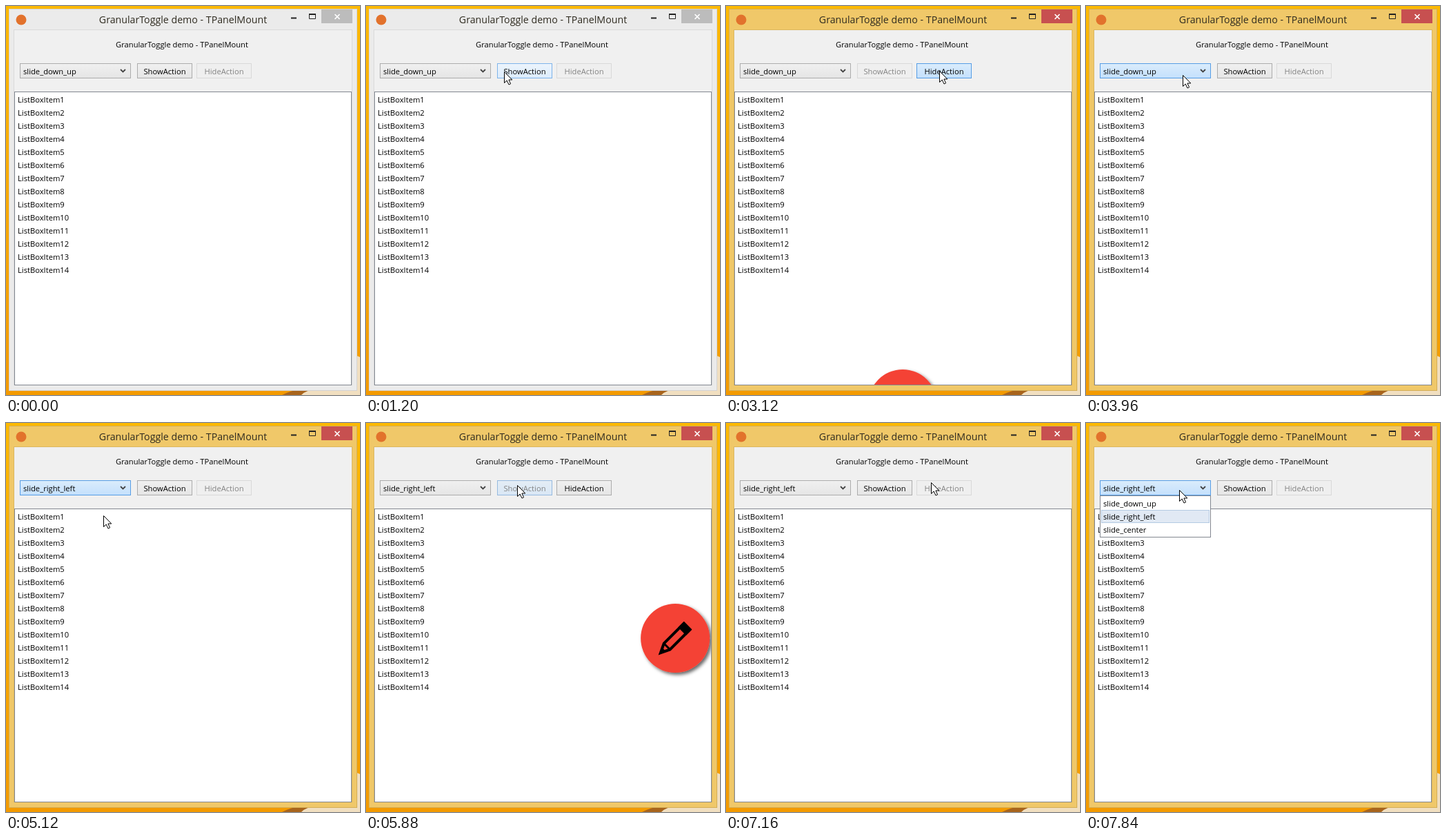
An HTML page that plays this animation: 513 px wide and 564 px high, repeating every 8000 ms.

```html
<!DOCTYPE html>
<html lang="en">
<head>
<meta charset="utf-8">
<title>Widget demo</title>
<style>
  html, body { margin: 0; width: 100%; height: 100%; overflow: hidden; }
  svg { display: block; width: 513px; height: 564px; }
  text { font: 11.2px "Open Sans", "Noto Sans", sans-serif; fill: #000; }
  .mid { text-anchor: middle; }
  .title { font-size: 14.2px; fill: #2f2b20; }
  .off { fill: #838383; }
</style>
</head>
<body>
<svg viewBox="0 0 513 564">
  <defs>
    <linearGradient id="desk" x2="0" y2="1"><stop stop-color="#fdb900"/><stop offset="1" stop-color="#f39a00"/></linearGradient>
    <linearGradient id="normal" x2="0" y2="1"><stop stop-color="#f0f0f0"/><stop offset="1" stop-color="#e5e5e5"/></linearGradient>
    <linearGradient id="hover" x2="0" y2="1"><stop stop-color="#ecf4fc"/><stop offset="1" stop-color="#dcecfc"/></linearGradient>
    <linearGradient id="press" x2="0" y2="1"><stop stop-color="#daecfc"/><stop offset="1" stop-color="#c4e0fc"/></linearGradient>
    <filter id="shadow" x="-20%" y="-20%" width="140%" height="140%">
      <feDropShadow dx="3" dy="3" stdDeviation="2.6" flood-opacity=".6"/>
    </filter>
    <clipPath id="area"><rect x="13" y="125" width="487" height="424"/></clipPath>
  </defs>

  <rect width="513" height="564" fill="url(#desk)"/>
  <path d="M400 564Q412 558 424 556H445V564Z" fill="#a8641c"/>
  <path d="M428 564Q436 556 450 556H508V507L513 509V564Z" fill="#f1dfc0"/>

  <rect id="frame" x="4.5" y="4.5" width="504" height="553"/>
  <circle cx="22" cy="20" r="7.5" fill="#e2722c"/>
  <text class="mid title" x="256.5" y="25">GranularToggle demo - TPanelMount</text>
  <path d="M413 17.5H421" stroke="#222" stroke-width="2"/>
  <path d="M439.5 12V18.5H448.5V12M439 12H449" fill="none" stroke="#222"/>
  <path d="M439 12H449" stroke="#222" stroke-width="2"/>
  <rect id="close" x="457" y="5" width="45" height="20"/>
  <path d="M476.5 12L483.5 19M483.5 12L476.5 19" stroke="#fff" stroke-width="1.7"/>
  <rect id="client" x="11.5" y="34.5" width="490" height="515" fill="#f0f0f0"/>
  <text class="mid" x="255" y="60">GranularToggle demo - TPanelMount</text>
  <rect x="12.5" y="124.5" width="488" height="425" fill="#fff" stroke="#828790"/>
  <g id="list"></g>

  <g clip-path="url(#area)">
    <g id="fab">
      <circle r="50" fill="#f44336" filter="url(#shadow)"/>
      <g transform="rotate(-45)">
        <path d="M-30 0L-17-6.2H24V6.2H-17Z" fill="none" stroke="#000" stroke-width="4"/>
        <path d="M-17-6V6" stroke="#000" stroke-width="3"/>
        <path d="M-32 0L-23-4.5V4.5ZM14-8.2H26V8.2H14Z"/>
      </g>
    </g>
  </g>

  <g id="controls"></g>
  <path d="M166 92L169.5 95.5L173 92" fill="none" stroke="#444" stroke-width="1.8"/>
  <g id="popup">
    <rect x="20.5" y="105.5" width="160" height="60" fill="#fff" stroke="#828790"/>
    <rect id="mark" x="22.5" width="156" height="18" fill="#e1e9f4" stroke="#b4cbe3"/>
  </g>
  <path id="cursor" d="M.5.5V16.5L4.2 13L7 19L9.6 17.8L6.9 12H11.8Z" fill="#fff" stroke="#000"/>
</svg>
<script>
const LOOP = 8000, STEP = 40;
const $ = id => document.getElementById(id);
const modes = ["slide_down_up", "slide_right_left", "slide_center"];
const put = (id, html) => $(id).insertAdjacentHTML("beforeend", html);
const move = (id, x, y) => $(id).setAttribute("transform", `translate(${x} ${y})`);
const show = (id, on) => { $(id).style.display = on ? "" : "none"; };
const clamp = v => Math.max(0, Math.min(1, v));
const within = (t, a, b) => t >= a && t < b;
// 1 from a until b, then fading to 0 at c
const pulse = (t, a, b, c) => t < a ? 0 : 1 - clamp((t - b) / (c - b));

for (let i = 0; i < 14; i++) put("list", `<text x="17" y="${140 + 19 * i}">ListBoxItem${i + 1}</text>`);
modes.forEach((m, i) => put("popup", `<text x="25" y="${121 + 19 * i}">${m}</text>`));

class Control {
  constructor(id, x, w, label, centred) {
    Object.assign(this, { id, x, w });
    const layer = (kind, fill, line) =>
      `<rect id="${id}-${kind}" x="${x + .5}" y="83.5" width="${w - 1}" height="21" fill="${fill}" stroke="${line}"/>`;
    put("controls", layer("normal", "url(#normal)", "#acacac") + layer("off", "#efefef", "#d9d9d9") +
      layer("hover", "url(#hover)", "#7eb4ea") + layer("press", "url(#press)", "#569de5") +
      `<text id="${id}-text" y="99" x="${centred ? x + w / 2 : x + 5}" class="${centred ? "mid" : ""}">${label}</text>`);
  }
  contains([x, y]) { return within(x, this.x, this.x + this.w) && within(y, 83, 105); }
  set(off, hover, press) {
    show(this.id + "-off", off);
    show(this.id + "-hover", hover && !off);
    $(this.id + "-press").style.opacity = press;
    $(this.id + "-text").classList.toggle("off", off);
  }
}
const combo = new Control("combo", 20, 161, modes[0], false);
const showBtn = new Control("show", 190, 80, "ShowAction", true);
const hideBtn = new Control("hide", 276, 80, "HideAction", true);

// start, end, target x, target y, sag of the path
const trips = [
  [360, 720, 148, 96, 0], [1000, 1320, 224, 94, 0], [2480, 2680, 309, 94, 0],
  [3560, 3960, 140, 100, 9], [4280, 4560, 138, 136, 0], [5080, 5400, 219, 90, 0],
  [6240, 6520, 297, 86, 0], [7320, 7640, 135, 97, 12]
];
function pointer(t) {
  let x = 378, y = 534;
  for (const [a, b, tx, ty, sag] of trips) {
    if (t < a) break;
    const p = clamp((t - a) / (b - a)), s = p * p * (3 - 2 * p);
    x += (tx - x) * s;
    y += (ty - y) * s + 4 * sag * s * (1 - s);
  }
  return [Math.round(x), Math.round(y)];
}

// Distance of the round button from its resting place
function slide(t, arrive, leave) {
  if (t > leave) return 90 * ((t - leave) / 140) ** 1.5;
  return 165 * clamp((arrive - t) / 300) ** 3;
}

function draw(t) {
  const active = t >= 1680;
  $("frame").setAttribute("fill", active ? "#f0c869" : "#ebebeb");
  $("frame").setAttribute("stroke", active ? "#d3ae58" : "#d2d2d2");
  $("client").setAttribute("stroke", active ? "#dcb75f" : "#dadada");
  $("close").setAttribute("fill", active ? "#c75050" : "#bcbcbc");

  const at = pointer(t);
  show("cursor", t >= 360);
  move("cursor", ...at);

  const out = within(t, 1760, 3160) || within(t, 5720, 7000);
  const focus = pulse(t, 4120, 5600, 5720);
  const over = t >= 360 && combo.contains(at);
  combo.set(false, false, over ? 1 : focus);
  showBtn.set(out, t >= 360 && showBtn.contains(at),
    t < 4000 ? pulse(t, 1680, 1760, 2080) : pulse(t, 5600, 5760, 6000));
  hideBtn.set(!out, hideBtn.contains(at),
    t < 4000 ? pulse(t, 2960, 3120, 3320) : pulse(t, 6760, 7000, 7160));
  $("combo-text").textContent = modes[+(t >= 4840)];

  show("popup", within(t, 4120, 4840) || t >= 7840);
  $("mark").setAttribute("y", at[1] >= 126 || t >= 7840 ? 126.5 : 107.5);

  show("fab", within(t, 1740, 3320) || within(t, 5640, 7160));
  if (t < 4000) move("fab", 256, 487 + slide(t, 2080, 2980));
  else move("fab", 445 + slide(t, 5960, 6820), 312);
}

function tick(now) {
  draw(Math.floor(now % LOOP / STEP) * STEP);
  requestAnimationFrame(tick);
}
draw(0);
requestAnimationFrame(tick);
</script>
</body>
</html>
```
